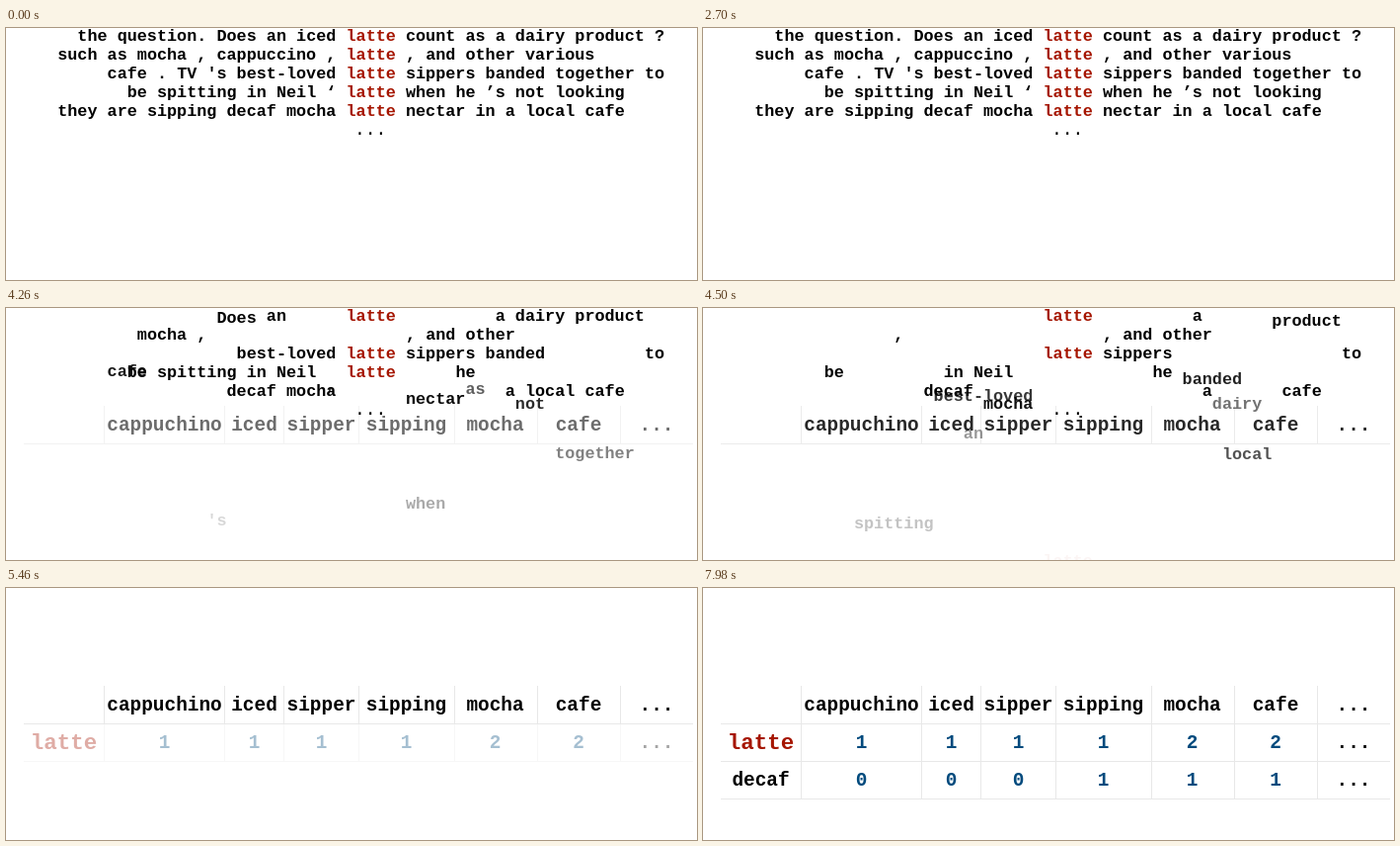
These frames come from a looping animation (700 px wide and 255 px high, 8 s). An HTML page with a canvas:

```html
<!DOCTYPE html>
<html lang="en">
<head>
<meta charset="utf-8">
<title>From contexts to co-occurrence counts</title>
<style>
  html, body { margin: 0; width: 100%; height: 100%; overflow: hidden; background: #fff; }
  canvas { display: block; width: 700px; height: 255px; }
</style>
</head>
<body>
<canvas id="stage"></canvas>
<script>
const LOOP = 8000, WIDTH = 700, HEIGHT = 255;
const RED = '#a51500', BLUE = '#004a7d', BLACK = '#000', GRID = '#e8e8e8';
const FAMILY = '"Liberation Mono", "Courier New", monospace';

const canvas = document.getElementById('stage');
const ctx = canvas.getContext('2d');
const ratio = window.devicePixelRatio || 1;
canvas.width = WIDTH * ratio;
canvas.height = HEIGHT * ratio;
ctx.scale(ratio, ratio);

// Concordance: every line is aligned on its keyword.
const KEYWORD = 'latte', KEY_X = 344.5, TEXT_SIZE = 16.8, ADVANCE = TEXT_SIZE * 0.6;
const contexts = [
  'the question. Does an iced latte count as a dairy product ?',
  'such as mocha , cappuccino , latte , and other various',
  "cafe . TV 's best-loved latte sippers banded together to",
  'be spitting in Neil ‘ latte when he ’s not looking',
  'they are sipping decaf mocha latte nectar in a local cafe',
];
const words = contexts.flatMap((line, row) =>
  [...line.matchAll(/\S+/g)].map(match => ({
    text: match[0],
    x: KEY_X + (match.index - line.indexOf(KEYWORD)) * ADVANCE,
    y: 13 + 19 * row,
    color: match[0] === KEYWORD ? RED : BLACK,
    font: `bold ${TEXT_SIZE}px ${FAMILY}`,
  })));
words.push({ text: '...', x: 353, y: 108, color: BLACK, font: `18px ${FAMILY}` });

// Words drop one after another in this order.
const FALL_START = 3605, FALL_STEP = 22.7, FALL_TIME = 220, FALL_DEPTH = 200;
const fallOrder = [
  45, 12, 46, 0, 1, 49, 18, 11, 4, 16, 43, 13, 25, 6, 51, 24, 41, 22, 44,
  37, 26, 39, 31, 7, 17, 42, 23, 50, 2, 14, 38, 34, 3, 9, 53, 27, 30, 48,
  10, 47, 36, 19, 52, 32, 5, 33, 21, 54, 28, 15, 40, 8, 20, 35, 29, 55,
];
fallOrder.forEach((word, i) => { words[word].launch = FALL_START + FALL_STEP * i; });

// Count table
const centers = [58.5, 160.5, 251.5, 319.5, 405.5, 495.5, 580, 659];
const dividers = [99, 221, 281, 357, 454, 538, 622];
const rows = [
  { cells: ['', 'cappuchino', 'iced', 'sipper', 'sipping', 'mocha', 'cafe', '...'],
    top: 99, start: 3600, duration: 1200, color: BLACK },
  { cells: ['latte', 1, 1, 1, 1, 2, 2, '...'],
    top: 137, start: 5060, duration: 1000, color: BLUE },
  { cells: ['decaf', 0, 0, 0, 1, 1, 1, '...'],
    top: 175, start: 6710, duration: 1000, color: BLUE },
];

function smooth(x) {
  const u = Math.min(1, Math.max(0, x));
  return u * u * (3 - 2 * u);
}

function drawWord(word, time) {
  const progress = Math.max(0, (time - word.launch) / FALL_TIME);
  if (progress >= 1) return;
  const drop = progress * progress;
  ctx.globalAlpha = 1 - drop;
  ctx.fillStyle = word.color;
  ctx.font = word.font;
  ctx.fillText(word.text, word.x, word.y + FALL_DEPTH * drop);
}

function drawRow({ cells, top, start, duration, color }, time) {
  ctx.globalAlpha = smooth((time - start) / duration);
  ctx.fillStyle = GRID;
  ctx.fillRect(18, top + 38, 678, 1);
  dividers.forEach(x => ctx.fillRect(x, top, 1, 38));
  cells.forEach((cell, i) => {
    const isKeyword = cell === KEYWORD;
    ctx.fillStyle = isKeyword ? RED : i === 0 || cell === '...' ? BLACK : color;
    ctx.font = `bold ${isKeyword ? 22.5 : 19.4}px ${FAMILY}`;
    ctx.fillText(cell, centers[i], top + (isKeyword ? 26 : 25));
  });
}

function draw() {
  const time = performance.now() % LOOP;
  ctx.globalAlpha = 1;
  ctx.fillStyle = '#fff';
  ctx.fillRect(0, 0, WIDTH, HEIGHT);
  ctx.textAlign = 'center';
  rows.forEach(row => drawRow(row, time));
  ctx.textAlign = 'left';
  words.forEach(word => drawWord(word, time));
  requestAnimationFrame(draw);
}
draw();
</script>
</body>
</html>
```
